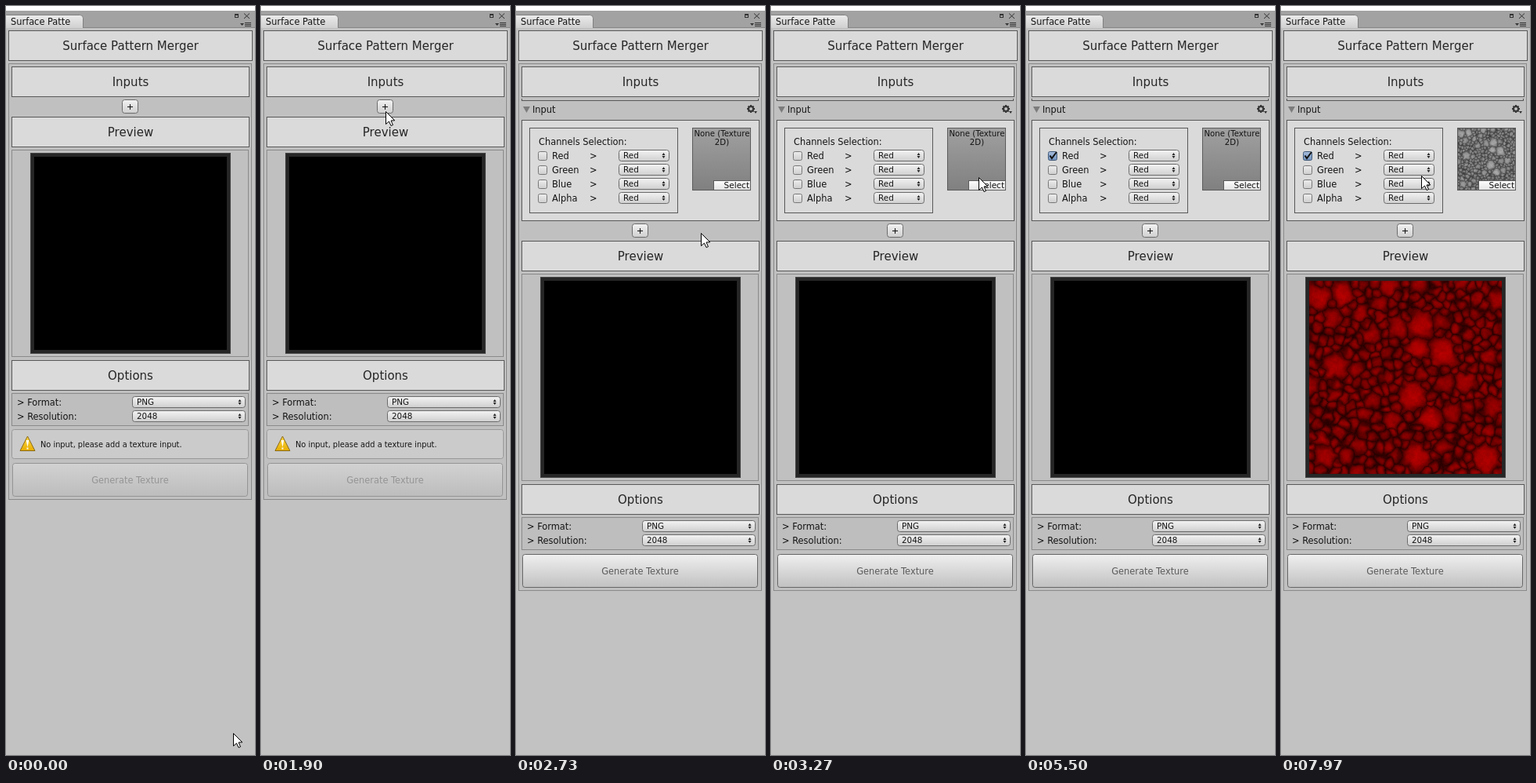
Animation of 318 by 954 pixels, one loop 8 s. Source, as an HTML page with a canvas:

```html
<!DOCTYPE html>
<html lang="en">
<head>
<meta charset="utf-8">
<title>Surface Pattern Merger</title>
<style>
html, body { margin: 0; width: 318px; height: 954px; overflow: hidden; background: #c2c2c2; }
canvas { display: block; }
</style>
</head>
<body>
<canvas id="stage" width="318" height="954"></canvas>
<script>
const ctx = document.getElementById('stage').getContext('2d');
const LOOP = 8000;
const ADDED = 2070, PRESSED = 3870, CHECKED = 4000, LOADED = 6770;
const PICKER_OPENS = 5490, PICKER_CLOSES = 7570;
const INK = '#141414', LINE = '#585858', SOFT_LINE = '#8a8a8a';

// ---------- procedural rock texture ----------
const SIZE = 246;

function seeded(seed) {
  return () => {
    seed = (seed * 1664525 + 1013904223) >>> 0;
    return seed / 4294967296;
  };
}

function makeNoise(rand) {
  const grid = Array.from({ length: 4096 }, rand);
  const at = (x, y) => grid[(y & 63) * 64 + (x & 63)];
  const fade = t => t * t * (3 - 2 * t);
  return (x, y) => {
    const ix = Math.floor(x), iy = Math.floor(y);
    const u = fade(x - ix), v = fade(y - iy);
    const top = at(ix, iy) + (at(ix + 1, iy) - at(ix, iy)) * u;
    const low = at(ix, iy + 1) + (at(ix + 1, iy + 1) - at(ix, iy + 1)) * u;
    return top + (low - top) * v;
  };
}

// Stones are packed from the largest to the smallest.
function packStones(rand) {
  const stones = [];
  for (let i = 0; i < 4000; i++) {
    const r = 6 + 14 * Math.exp(-stones.length / 22);
    const x = rand() * SIZE, y = rand() * SIZE;
    if (stones.some(s => Math.hypot(s.x - x, s.y - y) < (s.r + r) * 0.8)) continue;
    stones.push({ x, y, r, level: 0.5 + r / 60 + rand() * 0.12 });
  }
  return stones;
}

function makeHeights() {
  const rand = seeded(77), noise = makeNoise(rand), stones = packStones(rand);
  const heights = new Float32Array(SIZE * SIZE);
  for (let y = 0; y < SIZE; y++) {
    for (let x = 0; x < SIZE; x++) {
      const px = x + (noise(x / 8, y / 8) - 0.5) * 6;
      const py = y + (noise(x / 8 + 30, y / 8 + 17) - 0.5) * 6;
      let near = Infinity, next = Infinity, level = 0;
      for (const s of stones) {
        const d = Math.hypot(px - s.x, py - s.y) / s.r;
        if (d < near) { next = near; near = d; level = s.level; }
        else if (d < next) next = d;
      }
      const edge = Math.sqrt(Math.min(1, next - near));
      const dome = 1 - 0.32 * Math.min(1.2, near) ** 2;
      const grain = noise(x / 4, y / 4) * 0.6 + noise(x / 1.5, y / 1.5) * 0.4 - 0.5;
      heights[y * SIZE + x] = Math.max(0.1, level * (0.5 + 0.5 * edge) * dome + grain * 0.16);
    }
  }
  return heights;
}

function paintTexture(heights, colour) {
  const canvas = document.createElement('canvas');
  canvas.width = canvas.height = SIZE;
  const c = canvas.getContext('2d'), image = c.createImageData(SIZE, SIZE);
  heights.forEach((h, i) => image.data.set([...colour(h), 255], i * 4));
  c.putImageData(image, 0, 0);
  return canvas;
}

const heights = makeHeights();
const redTexture = paintTexture(heights, h => [h * 205, 0, 0]);
const greyTexture = paintTexture(heights, h => Array(3).fill(30 + h * 160));

// ---------- drawing helpers ----------
function rect(x, y, w, h, fill) {
  ctx.fillStyle = fill;
  ctx.fillRect(x, y, w, h);
}

function box(x, y, w, h, fill, border) {
  rect(x, y, w, h, border);
  rect(x + 1, y + 1, w - 2, h - 2, fill);
}

function text(str, x, y, size = 11.4, colour = INK, align = 'left') {
  ctx.font = `${size}px "DejaVu Sans", sans-serif`;
  ctx.textAlign = align;
  ctx.fillStyle = colour;
  ctx.fillText(str, x, y);
}

function poly(points, fill) {
  ctx.beginPath();
  points.forEach(([x, y]) => ctx.lineTo(x, y));
  ctx.closePath();
  ctx.fillStyle = fill;
  ctx.fill();
}

// Triangle with a level base at y and its tip h below (or above).
function triangle(x, y, half, h, fill) {
  poly([[x - half, y], [x + half, y], [x, y + h]], fill);
}

function shade(y, h, top, bottom) {
  const g = ctx.createLinearGradient(0, y, 0, y + h);
  g.addColorStop(0, top);
  g.addColorStop(1, bottom);
  return g;
}

function rounded(x, y, w, h, r, fill, border) {
  ctx.beginPath();
  ctx.roundRect(x + 0.5, y + 0.5, w - 1, h - 1, r);
  ctx.fillStyle = fill;
  ctx.fill();
  ctx.strokeStyle = border;
  ctx.stroke();
}

function button(x, y, w, h) {
  rounded(x, y, w, h, 3, shade(y, h, '#f4f4f4', '#cecece'), '#6b6b6b');
}

function header(label, y, x = 7, w = 304) {
  box(x, y, w, 39, '#dadada', LINE);
  text(label, 159, y + 25, 15, '#262626', 'center');
}

function popup(label, x, y, w) {
  button(x, y, w, 15);
  text(label, x + 6, y + 11, 10.4);
  triangle(x + w - 7.5, y + 7, 2, -3, '#222');
  triangle(x + w - 7.5, y + 8, 2, 3, '#222');
}

// ---------- panel parts ----------
function windowFrame() {
  rect(0, 0, 318, 954, '#c2c2c2');
  rect(0, 0, 318, 6, '#ffffff');
  rect(0, 6, 318, 22, '#a2a2a2');
  rect(0, 27, 318, 1, '#858585');
  rounded(-4, 11, 103, 22, 4, shade(11, 17, '#ececec', '#d0d0d0'), '#808080');
  rect(0, 28, 318, 6, '#c2c2c2');
  text('Surface Patte', 6, 24);

  box(292, 10, 5, 5, '#a2a2a2', '#333');
  rect(292, 10, 5, 2, '#333');
  ctx.strokeStyle = '#333';
  ctx.beginPath();
  ctx.moveTo(304, 9.5); ctx.lineTo(311, 16);
  ctx.moveTo(311, 9.5); ctx.lineTo(304, 16);
  ctx.stroke();
  triangle(301.5, 22, 2.5, 3, '#333');
  for (let y = 21; y < 27; y += 2) rect(305, y, 8, 1, '#333');
  header('Surface Pattern Merger', 31, 3, 312);
}

function gear(x, y) {
  ctx.strokeStyle = '#333';
  ctx.lineWidth = 2;
  ctx.beginPath();
  for (let i = 0; i < 8; i++) {
    const c = Math.cos(i * Math.PI / 4), s = Math.sin(i * Math.PI / 4);
    ctx.moveTo(x + c * 3, y + s * 3);
    ctx.lineTo(x + c * 5, y + s * 5);
  }
  ctx.moveTo(x + 3, y);
  ctx.arc(x, y, 3, 0, 7);
  ctx.stroke();
  ctx.lineWidth = 1;
  triangle(x + 6, y + 3, 2, 3, '#333');
}

function checkbox(x, y, on, down) {
  const top = on ? '#a9bfdd' : down ? '#b0b0b0' : '#eeeeee';
  const bottom = on ? '#6f90bd' : down ? '#989898' : '#cdcdcd';
  rounded(x, y, 12, 12, 2, shade(y, 12, top, bottom), on ? '#3f5878' : '#777');
  if (!on) return;
  ctx.strokeStyle = '#111';
  ctx.lineWidth = 2;
  ctx.beginPath();
  ctx.moveTo(x + 2.5, y + 5.5);
  ctx.lineTo(x + 5, y + 9);
  ctx.lineTo(x + 11, y + 1);
  ctx.stroke();
  ctx.lineWidth = 1;
}

function textureSlot(loaded) {
  box(225, 155, 75, 80, shade(155, 80, '#a0a0a0', '#808080'), '#5c5c5c');
  if (loaded) {
    ctx.drawImage(greyTexture, 0, 0, 230, SIZE, 226, 156, 73, 78);
  } else {
    text('None (Texture', 263, 166, 10.2, INK, 'center');
    text('2D)', 263, 177, 10.2, INK, 'center');
  }
  box(252, 222, 48, 13, shade(222, 13, '#ffffff', '#e2e2e2'), '#5c5c5c');
  text('Select', 298, 232, 10.5, INK, 'right');
}

function inputPanel(t) {
  rect(7, 118, 1, 3, LINE);
  rect(309, 118, 1, 3, LINE);
  rect(7, 120, 303, 1, LINE);
  triangle(13.5, 128, 4.5, 8, '#7c7c7c');
  text('Input', 21, 136);
  gear(300, 131);
  box(7, 145, 304, 129, '#dadada', LINE);
  box(17, 155, 190, 109, '#dadada', LINE);
  text('Channels Selection:', 29, 177);
  ['Red', 'Green', 'Blue', 'Alpha'].forEach((name, i) => {
    const y = 185 + i * 18;
    checkbox(28, y, i === 0 && t >= CHECKED, i === 0 && t >= PRESSED);
    text(name, 46, y + 10);
    text('>', 94, y + 10);
    popup('Red', 131, y - 2, 65);
  });
  textureSlot(t >= LOADED);
}

function preview(y, loaded) {
  header('Preview', y);
  box(7, y + 42, 303, 264, '#c0c0c0', SOFT_LINE);
  box(31, y + 46, 256, 256, '#262626', '#444');
  if (loaded) ctx.drawImage(redTexture, 36, y + 51);
  else rect(36, y + 51, SIZE, SIZE, '#000');
}

function options(y) {
  header('Options', y);
  box(7, y + 42, 303, 42, '#bebebe', SOFT_LINE);
  [['> Format:', 'PNG'], ['> Resolution:', '2048']].forEach(([label, value], i) => {
    text(label, 14, y + 58 + i * 18);
    popup(value, 161, y + 46 + i * 18, 145);
  });
}

function warning() {
  rounded(7, 539, 303, 38, 3, '#cbcbcb', '#999');
  ctx.lineJoin = 'round';
  triangle(27.5, 566.5, 9.5, -18.5, shade(547, 20, '#ffdc4a', '#e6ac00'));
  ctx.strokeStyle = '#8a6a18';
  ctx.stroke();
  ctx.lineJoin = 'miter';
  triangle(27.5, 553, 1.8, 9, '#fff');
  rect(26.5, 562.5, 2, 2, '#fff');
  text('No input, please add a texture input.', 44, 562, 9.8);
}

function generateButton(y, enabled) {
  const fill = enabled ? shade(y, 43, '#f0f0f0', '#c0c0c0') : shade(y, 43, '#d2d2d2', '#bcbcbc');
  rounded(8, y, 301, 43, 3, fill, enabled ? '#666' : '#949494');
  text('Generate Texture', 158.5, y + 26, 11.4, enabled ? '#5c5c5c' : '#959595', 'center');
}

function addButton(y) {
  button(148, y, 21, 18);
  rect(155, y + 9, 7, 1, '#111');
  rect(158, y + 6, 1, 7, '#111');
}

// ---------- pointer ----------
// Each move eases out along a curve pulled towards `via`; without it the move is straight.
const moves = [
  { from: 280, until: 900, to: [256, 274] },
  { from: 1150, until: 1900, via: [183, 234], to: [159, 134] },
  { from: 2310, until: 3130, via: [190, 424], to: [272, 221] },
  { from: 3170, until: 3600, via: [343, 226], to: [29, 187] },
  { from: 4410, until: 4730, to: [171, 194] },
  { from: 4790, until: 5230, via: [215, -170], to: [275, 225] },
  { from: 5310, until: 5500, to: [47, 227] },
  { from: 7540, until: 7630, to: [220, 243] },
  { from: 7810, until: 7970, to: [179, 216] }
];

function pointerAt(t) {
  let pos = [290, 926];
  for (const { from, until, via, to } of moves) {
    if (t <= from) break;
    const u = Math.min(1, (t - from) / (until - from)), s = u * (2 - u);
    pos = pos.map((a, i) => {
      const bend = via ? via[i] : (a + to[i]) / 2;
      return a * (1 - s) ** 2 + 2 * bend * s * (1 - s) + to[i] * s * s;
    });
  }
  return pos;
}

function pointer(t) {
  if (t >= PICKER_OPENS && t < PICKER_CLOSES) return;
  const [x, y] = pointerAt(t);
  ctx.save();
  ctx.translate(Math.round(x) + 0.5, Math.round(y) + 0.5);
  poly([[0, 0], [0, 16], [4, 12.5], [6.5, 18], [9, 17], [6.5, 11.5], [11.3, 11.3]], '#fff');
  ctx.strokeStyle = '#000';
  ctx.stroke();
  ctx.restore();
}

function draw(t) {
  const added = t >= ADDED, shift = added ? 158 : 0;
  ctx.lineWidth = 1;
  windowFrame();
  box(3, 73, 311, added ? 672 : 556, '#c0c0c0', SOFT_LINE);
  header('Inputs', 77);
  if (added) inputPanel(t);
  addButton(119 + shift);
  preview(141 + shift, t >= LOADED);
  options(451 + shift);
  if (!added) warning();
  generateButton(added ? 698 : 582, added);
  pointer(t);
}

const begin = performance.now();
function tick() {
  draw((performance.now() - begin) % LOOP);
  requestAnimationFrame(tick);
}
tick();
</script>
</body>
</html>
```
